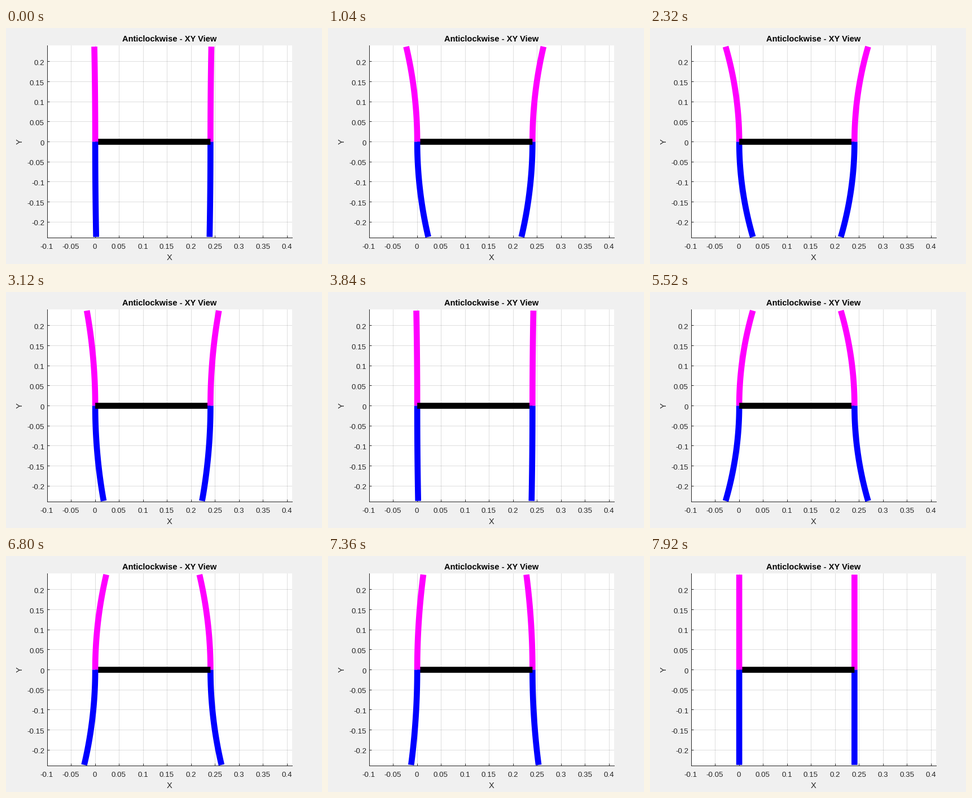
These frames come from a looping animation (560 by 420 pixels, 8 s). A matplotlib script:

```python
import numpy as np
import matplotlib.pyplot as plt
from matplotlib.animation import FuncAnimation
from matplotlib.transforms import ScaledTranslation

W, H, DPI = 560, 420, 100
PX = 72 / DPI                    # points per pixel
FRAMES, INTERVAL = 100, 80
LENGTH, BEND, SPAN = 0.24, 0.25, 0.24
BOX = (72.53, 46.85, 434, 342.3)  # plot area in pixels from the bottom left
INK = "#262626"

plt.rcParams["font.family"] = "Liberation Sans"

fig = plt.figure(figsize=(W / DPI, H / DPI), dpi=DPI, facecolor="#f0f0f0")
ax = fig.add_axes([BOX[0] / W, BOX[1] / H, BOX[2] / W, BOX[3] / H],
                  facecolor="white")
ax.set_xlim(-0.1, 0.41)
ax.set_ylim(-0.24, 0.24)
ax.set_axisbelow(True)

xticks = np.arange(-2, 9) * 0.05
yticks = np.arange(-4, 5) * 0.05
ax.set_xticks(xticks)
ax.set_yticks(yticks)
ax.grid(True, color=INK, alpha=0.15, linewidth=PX)
ax.tick_params(direction="in", length=4.3 * PX, width=PX, color=INK,
               labelbottom=False, labelleft=False)
for side, spine in ax.spines.items():
    spine.set_visible(side in ("left", "bottom"))
    spine.set_linewidth(PX)
    spine.set_color(INK)


def label(x, y, text, size=13.33, color=INK, ha="center", **kw):
    """Place text with its baseline at a pixel position from the top left."""
    fig.text(x / W, 1 - y / H, text, fontsize=size * PX, color=color,
             ha=ha, va="baseline", **kw)


def number(v):
    return f"{round(v, 2) + 0:g}"


for v in xticks:
    label(72.3 + (v + 0.1) / 0.51 * BOX[2], 393, number(v))
for v in yticks:
    label(68, 208.6 - v / 0.48 * BOX[3], number(v), ha="right")
label(289.5, 24, "Anticlockwise - XY View", 14.67, "black", weight="bold")
label(289.8, 413, "X", 14.67)
label(29, 201.8, "Y", 14.67, rotation=90, rotation_mode="anchor")

# Thick lines sit half a pixel off the snapped grid.
half = 0.5 / DPI
shifted = ax.transData + ScaledTranslation(half, -half, fig.dpi_scale_trans)


def bar(color, zorder):
    line, = ax.plot([], [], color=color, linewidth=10.67 * PX, zorder=zorder,
                    solid_capstyle="butt", snap=False, transform=shifted)
    return line


beam = bar("black", 3)
beam.set_data([0, SPAN], [0, 0])
left = [bar("magenta", 4), bar("blue", 4)]
right = [bar("magenta", 2), bar("blue", 2)]

# A leg is a circular arc whose bending plane turns about the Y axis.
arc = BEND * np.linspace(0, 1, 40)
rise = LENGTH / BEND * np.sin(arc)
sway = LENGTH / BEND * (1 - np.cos(arc))


def draw(i):
    theta = 2 * np.pi * (i + 1) / FRAMES
    dx = sway * np.sin(theta)
    left_front = np.cos(theta) > 0
    for sign, a, b in zip((1, -1), left, right):
        a.set_data(-sign * dx, sign * rise)
        b.set_data(SPAN + sign * dx, sign * rise)
        a.set_zorder(4 if left_front else 2)
        b.set_zorder(2 if left_front else 4)
    return left + right + [beam]


anim = FuncAnimation(fig, draw, frames=FRAMES, interval=INTERVAL,
                     repeat=True, repeat_delay=0, blit=False)
plt.show()
```
